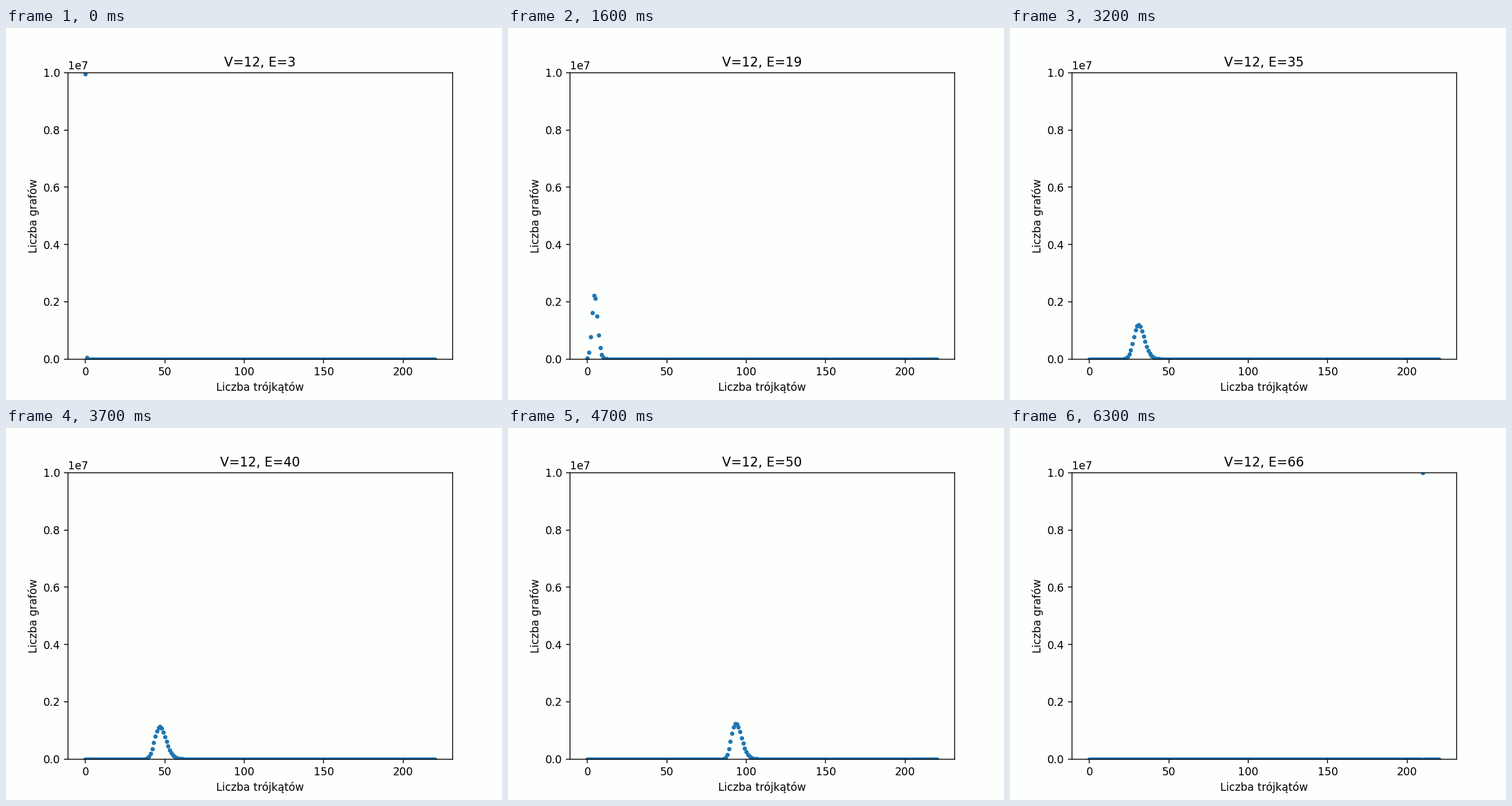
Recreate the animation shown at these times as a matplotlib script. Size 864 px wide and 648 px high, loop 6.4 s.

```python
import itertools

import matplotlib.pyplot as plt
import numpy as np
from matplotlib.animation import FuncAnimation

V = 12
EDGES = np.array(list(itertools.combinations(range(V), 2)))
N_EDGES = len(EDGES)
MAX_TRIANGLES = V * (V - 1) * (V - 2) // 6
TOTAL = 10_000_000
FIRST_E = 3
BACKGROUND = "#fdfffc"


def triangle_counts(chunks=20, size=20_000, seed=12):
    """Share of random graphs by edge count (row) and triangle count (column)."""
    rng = np.random.default_rng(seed)
    popcount = np.array([bin(i).count("1") for i in range(1 << V)], dtype=np.int64)
    bit = (1 << np.arange(V)).astype(np.uint16)
    first, second = EDGES.T
    hist = np.zeros((N_EDGES + 1, MAX_TRIANGLES + 1))
    rows = np.arange(size)
    for _ in range(chunks):
        order = np.tile(np.arange(N_EDGES, dtype=np.uint8), (size, 1))
        order = rng.permuted(order, axis=1).T.copy()
        adjacent = np.zeros((size, V), dtype=np.uint16)
        triangles = np.zeros(size, dtype=np.int64)
        # Each new edge closes one triangle per common neighbour.
        for e, pick in enumerate(order, start=1):
            u, v = first[pick], second[pick]
            near_u, near_v = adjacent[rows, u], adjacent[rows, v]
            triangles += popcount[near_u & near_v]
            adjacent[rows, u] = near_u | bit[v]
            adjacent[rows, v] = near_v | bit[u]
            hist[e] += np.bincount(triangles, minlength=MAX_TRIANGLES + 1)
    return hist / (chunks * size)


counts = TOTAL * triangle_counts()

fig, ax = plt.subplots(figsize=(6.4, 4.8), dpi=135, facecolor=BACKGROUND)
ax.set_facecolor(BACKGROUND)
(dots,) = ax.plot(np.arange(MAX_TRIANGLES + 1), counts[FIRST_E], ".", color="#1f77b4")
ax.set_xlim(-0.05 * MAX_TRIANGLES, 1.05 * MAX_TRIANGLES)
ax.set_ylim(0, TOTAL)
ax.set_xlabel("Liczba trójkątów")
ax.set_ylabel("Liczba grafów")
title = ax.set_title("")


def update(frame):
    e = FIRST_E + frame
    # The last step keeps the data of the graph with one edge missing.
    dots.set_ydata(counts[min(e, N_EDGES - 1)])
    title.set_text(f"V={V}, E={e}")
    return dots, title


anim = FuncAnimation(fig, update, frames=N_EDGES - FIRST_E + 1, interval=100,
                     repeat=True, repeat_delay=0)
plt.show()
```
